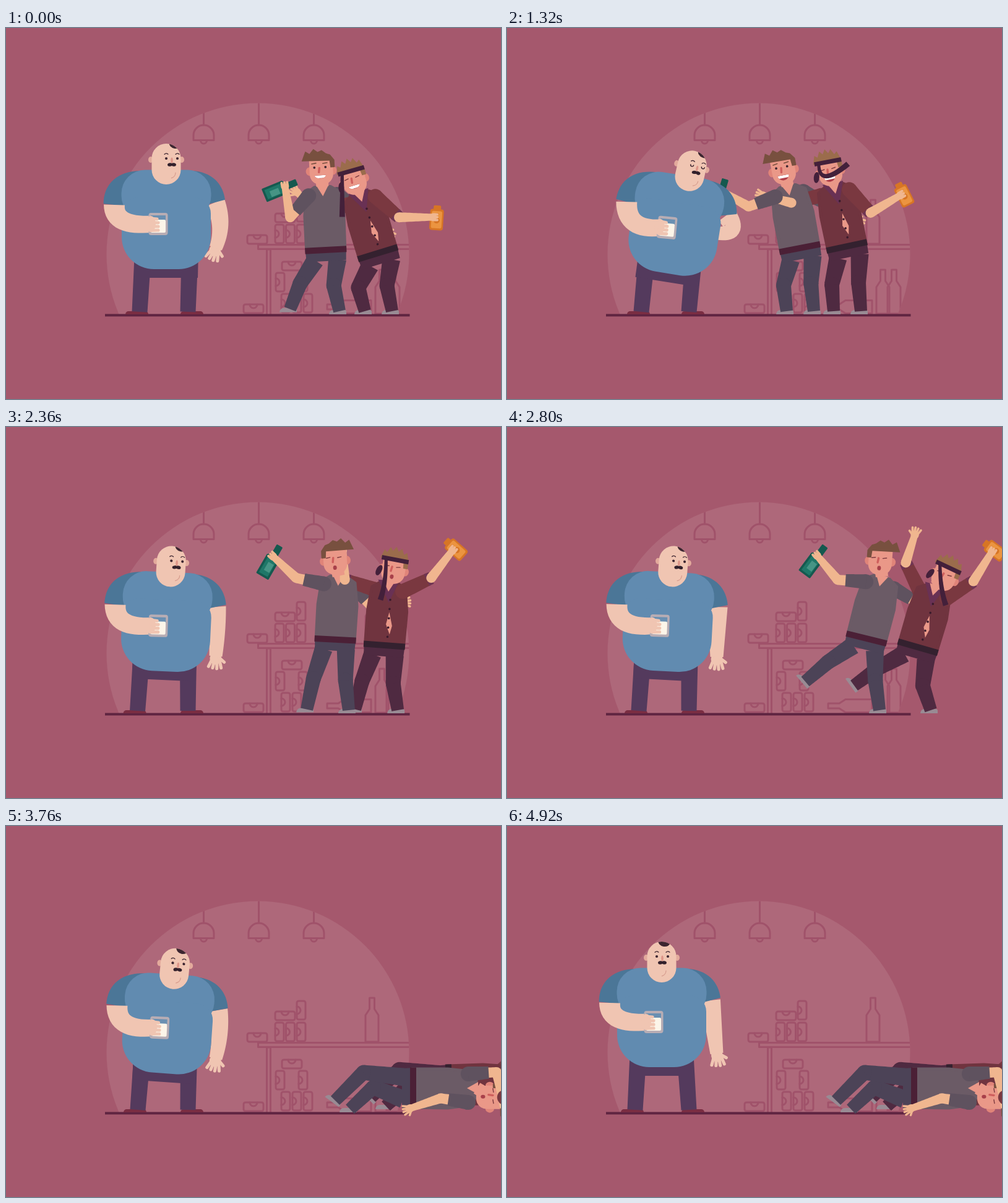
An HTML page with a canvas for the animation above (4960 ms loop, 800 by 600 pixels).

```html
<!DOCTYPE html>
<html lang="en">
<head>
<meta charset="utf-8">
<title>Bar scene</title>
<style>
html, body { margin: 0; width: 100%; height: 100%; overflow: hidden; background: #a5586d; }
canvas { display: block; width: 800px; height: 600px; }
</style>
</head>
<body>
<canvas id="stage" width="800" height="600"></canvas>
<script>
const g = document.getElementById('stage').getContext('2d');
const LOOP = 4960, STEP = 40, RAD = Math.PI / 180, TAU = Math.PI * 2, GROUND = 458;
const PEACH = '#f0b68f', PALE = '#f0c5b2', FACE = '#ea9888', DARK = '#43203a', INK = '#3c2530';

// [time, pose]: how far each side of the scene has come
const bigBeat = [[0, 0], [700, 1], [880, 1], [1320, 2], [1700, 3], [1960, 3], [2400, 4], [3400, 4],
  [3760, 5], [4000, 6.2], [4300, 6], [LOOP, 6]];
const ladBeat = [[0, 0], [600, 1], [880, 1], [1320, 2], [1700, 3], [1960, 3], [2620, 4], [2800, 4],
  [3440, 5], [LOOP, 5]];

// x, y, lean, height of the free hand
const bigKeys = [[259, 390, 0, 356], [265, 389, 3, 342], [260, 397, 9, 332], [238, 398, -11, 313],
  [256, 395, 3, 372], [256, 400, 4, 376], [250, 390, 0, 368]];

// x, y, lean, kick, bottle hand x and y, swing of the headband
const grey = {
  keys: [[517, 363, -3, -.45, 451, 257], [519, 353, 13, -1, 478, 186], [474, 360, -11, 0, 347, 264],
    [440, 351, -18, .95, 299, 212], [580, 346, 14, -.95, 502, 209], [654, 424, 90, 0, 803, 447]],
  arm: [46, 50], bend: -1, sleeve: .72, neck: 28, jolt: -24,
  shirt: '#6b5b66', cut: '#5f525f', pants: '#4c4357', belt: '#4b2036', hair: '#78503f'
};
const red = {
  keys: [[602, 368, -17, 0, 690, 306, 0], [601, 354, 13, -.55, 722, 222, 48], [550, 357, -12, 0, 635, 271, -90],
    [512, 351, -18, 1, 602, 196, 38], [663, 360, 16, -1, 783, 203, -8], [712, 419, 88, 0, 890, 450, 0]],
  arm: [51, 55], bend: 1, sleeve: 1, neck: 23, jolt: 20,
  shirt: '#70343f', cut: '#7a3840', pants: '#4f2a41', belt: '#34212f', hair: '#9b6c4c'
};

const clamp = v => Math.max(0, Math.min(1, v));
const mid = (a, b, k = .5) => a.map((v, j) => v + (b[j] - v) * k);
const angle = (a, b) => Math.atan2(b[1] - a[1], b[0] - a[0]) / RAD;
const polar = (p, deg, r) => [p[0] + r * Math.sin(deg * RAD), p[1] - r * Math.cos(deg * RAD)];

function progress(beat, t) {
  const i = beat.findIndex(b => b[0] > t);
  const [t0, a] = beat[i - 1], [t1, b] = beat[i], k = (t - t0) / (t1 - t0);
  return a + (b - a) * k * k * (3 - 2 * k);
}
function mix(rows, u) {
  const i = Math.min(Math.floor(u), rows.length - 2);
  return mid(rows[i], rows[i + 1], u - i);
}
function frame(x, y, a) {
  const c = Math.cos(a * RAD), s = Math.sin(a * RAD);
  return (px, py) => [x + px * c - py * s, y + px * s + py * c];
}

// Elbow of a two-bone arm; stretches when out of reach
function joint(a, b, l1, l2, side) {
  const dx = b[0] - a[0], dy = b[1] - a[1], dist = Math.hypot(dx, dy) || 1, d = Math.min(dist, l1 + l2);
  const along = (l1 * l1 - l2 * l2 + d * d) / (2 * d);
  const h = side * Math.sqrt(Math.max(0, l1 * l1 - along * along)) / dist, k = along / d;
  return [a[0] + dx * k - dy * h, a[1] + dy * k + dx * h];
}

function stroke(col, w) {
  g.strokeStyle = col;
  g.lineWidth = w;
  g.lineJoin = g.lineCap = 'round';
  g.stroke();
}
function poly(pts, col, round = 0) {
  g.beginPath();
  pts.forEach(p => g.lineTo(p[0], p[1]));
  g.closePath();
  g.fillStyle = col;
  g.fill();
  if (round) stroke(col, round);
}
function oval(x, y, rx, ry, col, a = 0) {
  g.beginPath();
  g.ellipse(x, y, rx, ry, a, 0, TAU);
  g.fillStyle = col;
  g.fill();
}
function box(x, y, w, h, r, col) {
  g.beginPath();
  g.roundRect(x, y, w, h, r);
  if (col) { g.fillStyle = col; g.fill(); }
}
function line(x1, y1, x2, y2, col, w) {
  g.beginPath();
  g.moveTo(x1, y1);
  g.lineTo(x2, y2);
  stroke(col, w);
}
function arc(x, y, r, a, b, col, w) {
  g.beginPath();
  g.arc(x, y, r, a, b);
  stroke(col, w);
}
function place(x, y, deg, paint) {
  g.save();
  g.translate(x, y);
  g.rotate(deg * RAD);
  paint();
  g.restore();
}

// Tapered ribbon along a quadratic curve
function ribbon(a, c, b, w0, w1, col) {
  const l = [], r = [];
  for (let i = 0; i <= 16; i++) {
    const k = i / 16, p = mid(mid(a, c, k), mid(c, b, k), k);
    const dir = angle(mid(a, c, k), mid(c, b, k)), w = (w0 + (w1 - w0) * k) / 2;
    l.push(polar(p, dir, w));
    r.unshift(polar(p, dir, -w));
  }
  poly(l.concat(r), col);
}
const bone = (a, b, w0, w1, col) => ribbon(a, mid(a, b), b, w0, w1, col);

function hand([x, y], deg, s, col) {
  place(x, y, deg, () => {
    g.scale(s, s);
    oval(4, 0, 12, 11, col);
    for (let i = 0; i < 4; i++) line(8, -8 + i * 5, 24 - Math.abs(i - 1.3) * 2, -12 + i * 8, col, 6);
    line(2, -6, 10, -17, col, 6);
  });
}

function room() {
  const ink = '#a0526a';
  g.fillStyle = '#a5586d';
  g.fillRect(0, 0, 800, 600);
  g.save();
  g.beginPath();
  g.rect(0, 0, 800, 464);
  g.clip();
  g.beginPath();
  g.arc(407, 366, 244.5, 0, TAU);
  g.clip();
  g.fillStyle = '#ae687a';
  g.fillRect(0, 0, 800, 600);
  for (let i = 0; i < 3; i++) {
    const x = 319.5 + i * 89;
    line(x, 110, x, 157, ink, 3);
    g.beginPath();
    g.moveTo(x - 16.5, 181.5);
    g.arc(x, 173.5, 16.5, Math.PI, 0);
    g.lineTo(x + 16.5, 181.5);
    g.closePath();
    stroke(ink, 3);
    arc(x, 182, 5, 0, Math.PI, ink, 3);
  }
  const can = (x, y, flat) => {
    box(x, y, flat ? 32 : 14, flat ? 14 : 30, 3);
    stroke(ink, 3);
    if (flat) arc(x + 16, y, 6, 0, Math.PI, ink, 3);
    else arc(x, y + 15, 6, -Math.PI / 2, Math.PI / 2, ink, 3);
  };
  for (let i = 0; i < 3; i++) {
    can(435 + i * 17.5, 318);
    can(445 + i * 18, 430);
  }
  can(470, 283);
  for (const x of [436, 473]) can(x, 396);
  for (const [x, y] of [[390, 335], [435, 300], [446, 378], [384, 447]]) can(x, y, true);
  g.beginPath();
  g.rect(407.5, 350.5, 260, 7);
  g.rect(421.5, 358, 6, 110);
  stroke(ink, 3);
  const bottle = (x, y, deg = 0) => place(x, y, deg, () => {
    g.beginPath();
    [[-4, 0], [4, 0], [4, 18], [10.5, 28], [10.5, 71], [-10.5, 71], [-10.5, 28], [-4, 18]]
      .forEach(p => g.lineTo(...p));
    g.closePath();
    stroke(ink, 3);
  });
  bottle(591.5, 278);
  bottle(607.5, 391);
  bottle(625.5, 391);
  bottle(519, 451, -90);
  g.restore();
  g.fillStyle = '#5f2441';
  g.fillRect(160, 462.5, 492.5, 4);
}

function bigMan(u) {
  const [x, y, a, reach] = mix(bigKeys, u), pt = frame(x, y, a);
  const pants = '#543a5d', dark = '#4b7697', blue = '#618bb0';
  for (const [foot, side, tilt] of [[x - 43, -1, 0], [294, 1, Math.min(0, a)]]) {
    place(foot, 463, tilt, () => box(side < 0 ? -23 : -12, -5, 37, 5, [5, 5, 0, 0], '#7a2d42'));
    bone(pt(side * 38, -20), [foot, 459], 27, 25, pants);
  }
  poly([pt(-52, -30), pt(52, -30), pt(51, 14), pt(-51, 14)], pants);

  const cuffL = pt(-84, -104), cuffR = pt(79, -108), end = [339, reach];
  const elbow = joint(cuffR, end, 40, 40, -1);
  hand(end, angle(elbow, end), .85, PALE);
  ribbon(cuffR, elbow, end, 32, 21, PALE);
  ribbon(pt(44, -134), pt(72, -135), cuffR, 50, 33, dark);
  ribbon(pt(-44, -134), pt(-81, -136), cuffL, 50, 35, dark);
  place(x, y, a, () => {
    box(-72.5, -160.5, 145, 80, 38, blue);
    box(-72, -116, 144, 116, [26, 26, 52, 52], blue);
  });

  place(...polar([x, y], a * 1.4, 170), a * 1.4, () => {
    const look = 9 - 8 * clamp((u - 4) / 2);
    for (const s of [-25, 25]) oval(s, -7, 4, 5, '#e3aa9c');
    box(-23.5, -33, 47, 66, 23.5, PALE);
    g.save();
    g.clip();
    oval(look * 1.3 + 3, -33, 10, 8, INK, .15);
    g.restore();
    g.translate(look, 0);
    for (const s of [-9, 9]) {
      if (u > 1.6 && u < 2.5) arc(s, -10, 2.5, 0, Math.PI, INK, 1.4);
      else oval(s, -9, 2.1, 2.1, INK);
      arc(s, -13, 4, 3.9, 5.5, INK, 1.3);
      oval(s / 3, 1, 4, 2.7, '#32202b', s / 45);
    }
    oval(0, -6, 1.8, 4.5, '#de9689');
    arc(-3, 14, 9, 0, 1.3, '#d59a8c', 1.2);
  });

  const [gx, gy] = pt(-13, -73);
  ribbon(cuffL, [cuffL[0] - 1, gy + 5], [gx - 10, gy], 34, 27, PALE);
  place(gx, gy, a * .6, () => {
    box(-15.5, -18, 31, 36, 4, '#b8adb4');
    box(-12, -14, 24, 12, 0, '#6a90b2');
    box(-12, -7, 24, 21, 2, '#fcf5e9');
    oval(-12, 0, 8, 13, PALE);
    for (let i = 0; i < 4; i++) line(-12, -9 + i * 6.5, i ? 0 : -2, -8 + i * 6, PALE, 5.2);
  });
}

function pose(who, u) {
  const [x, y, a, kick, hx, hy, swing] = mix(who.keys, u);
  return { ...who, u, x, y, a, kick, swing, grip: [hx, hy], pt: frame(x, y, a), fall: clamp(u - 4) };
}

// A kicking foot slides outward first, then leaves the ground
function leg(p, side) {
  const k = Math.max(0, side * p.kick), hip = p.pt(side * 18, 12);
  const up = [p.x + side * (22 + 80 * k), GROUND + (p.y + 58 - GROUND) * k ** 3];
  const foot = mid(up, [p.x - 110 + side * 12, p.y + 27 + side * 7], p.fall);
  const dist = Math.hypot(foot[0] - hip[0], foot[1] - hip[1]);
  const bend = Math.max(3, (95 - dist) * .7, p.fall * 28);
  const knee = polar(mid(hip, foot), angle(hip, foot), -bend);
  const lift = clamp((452 - foot[1]) / 10);
  place(...foot, (angle(knee, foot) - 90) * lift, () => box(-17, -2, 28, 7, [7, 3, 0, 0], '#998b94'));
  bone(hip, knee, 29, 24, p.pants);
  oval(...knee, 12, 12, p.pants);
  bone(knee, foot, 24, 20, p.pants);
}

function upperArm(p, side, e) {
  const s = p.pt(side * 23, -93), cut = mid(s, e, p.sleeve);
  bone(s, e, 18, 16, PEACH);
  oval(...s, 12, 12, p.cut);
  bone(s, cut, 24, 20, p.cut);
  if (p.sleeve === 1) bone(mid(s, e, .84), cut, 21, 20, '#6f3553');
}
function foreArm(e, h, open) {
  oval(...e, 8, 8, PEACH);
  bone(e, h, 16, 11, PEACH);
  if (open) hand(h, angle(e, h), .6, PEACH);
}
function bottleArm(p, bottle) {
  const e = joint(p.pt(p.bend * 23, -93), p.grip, ...p.arm, p.bend);
  const dir = angle(e, p.grip), [x, y] = p.grip;
  upperArm(p, p.bend, e);
  place(x + p.fall * 80, y, dir, bottle);
  foreArm(e, p.grip);
  place(x, y, dir, () => {
    oval(0, 0, 6, 6, PEACH);
    for (let i = -1; i < 2; i++) line(0, i * 4.5, 7, i * 4.5, PEACH, 4);
  });
}

function trunk(p) {
  const isRed = p.sleeve === 1;
  leg(p, 1);
  leg(p, -1);
  place(p.x, p.y, p.a, () => {
    poly([[-33, -4], [33, -4], [32, 14], [-32, 14]], p.pants);
    poly([[-31, -2], [31, -2], [32, -60], [27, -97], [13, -106], [-13, -106], [-27, -97], [-31, -60]], p.shirt, 5);
    g.fillStyle = p.belt;
    g.fillRect(-33.5, -9, 67, 10);
    if (isRed) {
      poly([[-18, -109], [16, -109], [2, -73]], '#693154');
      poly([[4, -58], [10, -36], [7, -22], [0, -38]], FACE);
      for (let i = 0; i < 5; i++) oval(4, -78 + i * 15, 1.8, 1.8, '#3a1b2c');
    }
    poly([[-10, -109], [10, -109], [0, -91]], FACE);
  });
}

function hair(isRed) {
  const pts = [], n = isRed ? 10 : 8;
  for (let i = 0; i <= n; i++) {
    const k = i / n, spike = i % 2 * (isRed ? 7 : 9 * (1 - k));
    pts.push([-24 + 46 * k - (isRed ? 0 : 7 * (1 - k)), -14 - 14 * Math.sin(Math.PI * k) ** .6 - spike]);
  }
  return pts.concat([[22, -2], [15, -2], [14, -13]]);
}

function head(p) {
  const isRed = p.sleeve === 1, gasp = p.u > 3.5, n = p.pt(0, -107);
  const jolt = p.jolt * Math.max(0, 1 - Math.abs(p.u - 4));
  const c = polar(n, p.a * 1.35 + jolt, p.neck), tilt = p.a + jolt * .4;
  bone(n, c, 20, 22, FACE);
  place(...c, tilt, () => {
    for (const x of [-19, 19]) oval(x, 3, 6, 7, '#e08479');
    box(-19, -25, 38, 50, [12, 12, 17, 17], FACE);
    g.save();
    if (!isRed && gasp) g.scale(-1, 1);
    poly(hair(isRed), p.hair);
    g.restore();
    if (isRed) {
      poly([[-22, -18], [22, -17], [22, -10], [-22, -11]], DARK);
      oval(-23, 7, 4.5, 9, DARK, .3);
    }
    for (const x of [-11, 7]) {
      if (isRed || gasp) line(x - 3, -2, x + 3, -3, '#7c3a3f', 1.4);
      else {
        oval(x, -3, 1.9, 1.9, INK);
        line(x - 4, -9, x + 3, -10, p.hair, 1.6);
      }
    }
    line(-3, -2, -4, 5, '#cf5f5d', 3.4);
    if (gasp) oval(-1, 14, 3, 3.6, '#a8404a');
    else {
      g.beginPath();
      g.ellipse(-2, 10, 9, 5 + 5 * clamp(p.u / 3), 0, 0, Math.PI);
      g.closePath();
      g.fillStyle = '#b03f4a';
      g.fill();
      g.save();
      g.clip();
      g.fillStyle = '#fff';
      g.fillRect(-12, 10, 20, 4.5);
      g.restore();
    }
  });
  if (isRed) {
    const knot = frame(...c, tilt)(-15, -14);
    ribbon(knot, [knot[0], knot[1] + 40], polar(knot, p.swing + 180, 70 - Math.abs(p.swing) * .25), 5, 9, DARK);
  }
}

function greenBottle() {
  g.rotate((77 + 90) * RAD);
  g.translate(0, 17);
  poly([[-10, -15], [-4, -20], [-4, -36], [4, -36], [4, -20], [10, -15], [10, 18], [-10, 18]], '#15594f', 3);
  poly([[-8, -13], [-2, -20], [2, -20], [8, -13], [8, 16], [-8, 16]], '#1f7768');
  g.fillStyle = '#469485';
  g.fillRect(-3, -6, 10, 15);
}
function orangeBottle() {
  g.translate(6, 2);
  g.rotate(4 * RAD);
  box(-6, -21, 12, 10, 2, '#d77525');
  box(-11, -15, 22, 34, 4, '#d77525');
  box(-8.5, -12, 17, 28, 3, '#eb9440');
  oval(0, 3, 5, 5, '#d77525');
  oval(0, -7, 3, 2, '#d77525');
}

function draw(t) {
  const u = progress(ladBeat, t), a = pose(grey, u), b = pose(red, u);
  const behind = u < 1.4, down = u > 4.4;

  // Each holds the other's shoulder until the push
  const hold = mid(a.pt(-40, -98), b.pt(-55, -175), clamp(u - 3));
  const hug = mid(b.pt(23, -66 - 2 * b.a * (1 - b.fall)), a.pt(32, -1), a.fall);
  const elbowB = joint(b.pt(-23, -93), hold, 50, 45, -1);
  const elbowA = joint(a.pt(23, -93), hug, 45, 50, 1);
  const hugArm = () => {
    upperArm(a, 1, elbowA);
    foreArm(elbowA, hug, true);
  };

  room();
  if (!down) hugArm();
  upperArm(b, -1, elbowB);
  if (behind) foreArm(elbowB, hold, true);
  trunk(b);
  trunk(a);
  if (down) hugArm();
  if (!behind) foreArm(elbowB, hold, true);
  head(a);
  bottleArm(a, greenBottle);
  bottleArm(b, orangeBottle);
  head(b);
  bigMan(progress(bigBeat, t));
}

const start = performance.now();
function tick(now) {
  const t = Math.max(0, now - start) % LOOP;
  draw(Math.floor(t / STEP) * STEP);
  requestAnimationFrame(tick);
}
draw(0);
requestAnimationFrame(tick);
</script>
</body>
</html>
```
